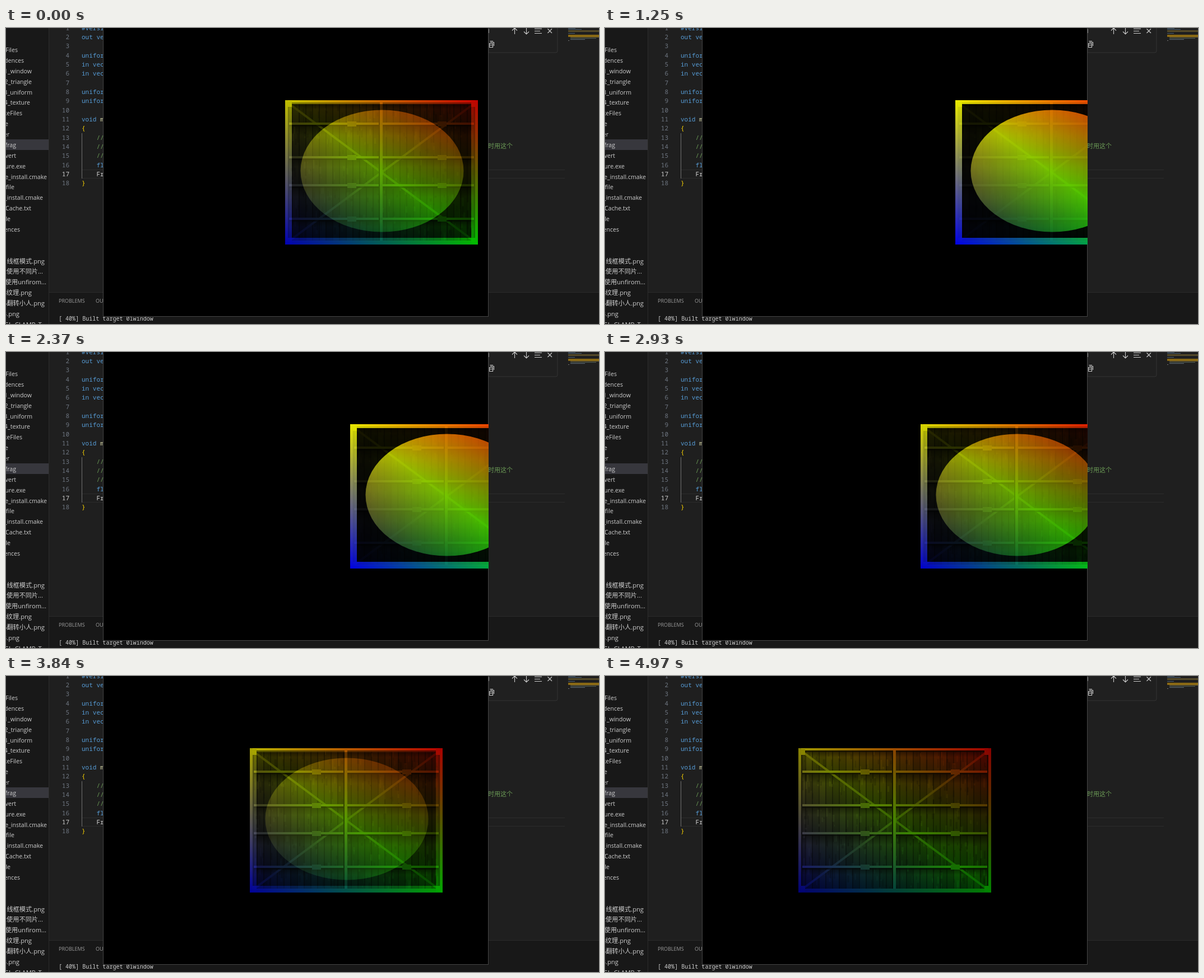
An HTML page with a canvas that plays this animation: 1058x529 px, repeating every 5.04 s.

```html
<!DOCTYPE html>
<html lang="en">
<head>
<meta charset="utf-8">
<title>Shader demo</title>
<style>
  html, body { margin: 0; width: 100%; height: 100%; overflow: hidden; background: #1f1f1f; }
  svg { position: absolute; left: 0; top: 0; }
  canvas { position: absolute; left: 174px; top: 0; }
  text { white-space: pre; dominant-baseline: alphabetic; }
  .ui { font: 10.6px "Open Sans", "Noto Sans CJK SC", "Noto Sans CJK", sans-serif; fill: #ccc; }
  .cjk { font-size: 11.2px; }
  .tab { font-size: 9px; fill: #9d9d9d; }
  .code { font: 11px "Noto Sans Mono", "Noto Sans CJK SC", "Noto Sans CJK", monospace; }
  .term { font: 10.06px "Noto Sans Mono", monospace; fill: #ccc; }
  .icon { fill: none; stroke: #ccc; stroke-width: 1.1; }
</style>
</head>
<body>
<svg id="editor" width="1058" height="529">
  <rect width="1058" height="529" fill="#1f1f1f"/>
  <path d="M135 253.5H997M135 268.5H997" stroke="#2c2c2c"/>
  <path d="M135.5 188V269" stroke="#707070"/>
  <rect width="76" height="529" fill="#181818"/>
  <rect y="199" width="76" height="19" fill="#37373d"/>
  <rect x="77" y="472" width="981" height="57" fill="#181818"/>
  <path d="M76.5 0V529M77 472.5H1058" stroke="#2b2b2b"/>
  <path d="M861 -1H984V41Q984 44 981 44H861Z" fill="#202020" stroke="#343434"/>
  <g class="icon">
    <path d="M907.5 11V0M903 4.5L907.5 0L912 4.5M928.5 0V11M924 6.5L928.5 11L933 6.5"/>
    <path d="M943 1.5H956M943 5.5H953M943 9.5H956M966.5 1.5L974 9M974 1.5L966.5 9"/>
    <path d="M862.5 27.5H868.5V34.5H862.5ZM864 25.5H870.5V32M863 30.5H868M863.5 23.5H869"/>
  </g>
  <path d="M861.5 2V9" stroke="#888"/>
  <g id="minimap"></g>
  <g id="labels"></g>
  <rect x="173.5" y="-1" width="687" height="516.5" fill="#000" stroke="#454545"/>
</svg>
<canvas id="view" width="687" height="515"></canvas>
<script>
const labels = document.getElementById('labels');
const minimap = document.getElementById('minimap');

function add(parent, tag, attrs, text = '') {
  const el = document.createElementNS('http://www.w3.org/2000/svg', tag);
  for (const key in attrs) el.setAttribute(key, attrs[key]);
  el.textContent = text;
  parent.append(el);
}
const label = (cls, x, y, text, fill, anchor = 'start') =>
  add(labels, 'text', { class: cls, x, y, 'text-anchor': anchor, ...(fill && { fill }) }, text);

// Sidebar: row number, right edge, name
[[0, 21, 'CMakeFiles'], [1, 32, 'dependences'], [2, 46, '01_window'], [3, 46, '02_triangle'],
 [4, 47, '03_uniform'], [5, 43, '04_texture'], [6, 29, 'CMakeFiles'], [7, 4, 'texture'],
 [8, 6, 'shader'], [9, 18, 'texture.frag'], [10, 18, 'texture.vert'], [11, 35, 'texture.exe'],
 [12, 73, 'cmake_install.cmake'], [13, 15, 'Makefile'], [14, 66, 'cmake_install.cmake'],
 [15, 45, 'CMakeCache.txt'], [16, 8, 'Makefile'], [17, 25, 'dependences'],
 [20, 69, '1线框模式.png'], [21, 66, '2使用不同片...'], [22, 72, '3使用unfirom...'],
 [23, 46, '4纹理.png'], [24, 69, '5翻转小人.png'], [25, 24, '3.png'], [26, 72, 'GL_CLAMP_T...']
].forEach(([row, x, name]) =>
  label(row < 20 ? 'ui' : 'ui cjk', x, 43 + row * 18.88, name, '', 'end'));

const blue = '#569cd6', green = '#6a9955', gold = '#ffd700';
const code = {
  1: ['#version', blue], 2: ['out vec4', blue], 4: ['uniform', blue], 5: ['in vec3', blue],
  6: ['in vec2', blue], 8: ['uniform', blue], 9: ['uniform', blue], 11: ['void', blue],
  12: ['{', gold], 13: ['    //', green], 14: ['    //', green], 15: ['    //', green],
  16: ['    fl', blue], 17: ['    Fr', '#d4d4d4'], 18: ['}', gold]
};
for (let n = 1; n <= 18; n++) {
  const y = 20 + (n - 2) * 16.33;
  label('code', 113, y, n, n === 17 ? '#ccc' : '#6e7681', 'end');
  if (code[n]) label('code', 135, y, ...code[n]);
}
label('code', 168, 20 + 9 * 16.33, 'm', '#dcdcaa');
label('code', 904, 215, '时用这个', green, 'end');
label('ui tab', 94, 491, 'PROBLEMS');
label('ui tab', 160, 491, 'OUTPUT');
label('term', 94, 523, '[ 40%] Built target 01window');

// Minimap: x, y, width, height, colour
[[1003, 0, 13, 1, '#4d6173'], [1003, 2, 24, 1, '#4d6173'], [1003, 4, 55, 3, '#554a29'],
 [1003, 9, 12, 1, '#4d6173'], [1003, 12, 55, 4, '#8a6914'], [1007, 16, 51, 1, '#6d6034'],
 [1007, 18, 46, 1, '#596358'], [1007, 20, 26, 1, '#5e6b75'], [1003, 22, 2, 1, '#777']
].forEach(([x, y, width, height, fill]) => add(minimap, 'rect', { x, y, width, height, fill }));

const W = 344, H = 258;
function layer(paint) {
  const c = document.createElement('canvas');
  c.width = W;
  c.height = H;
  const g = c.getContext('2d');
  if (paint) paint(g);
  return c;
}
let seed = 7;
const rand = () => (seed = seed * 16807 % 2147483647) / 2147483647;
const grey = (v, a = 1) => `rgba(${v},${v * .95},${v * .87},${a})`;

const crate = layer(g => {
  const rect = (x, y, w, h, v, a) => { g.fillStyle = grey(v, a); g.fillRect(x, y, w, h); };
  const beams = [2, 42, 102, 152, 212, 253];
  for (let i = 0; i < 5; i++) {
    const top = beams[i], h = beams[i + 1] - top;
    for (let x = 0; x < W; x += 12) {
      rect(x, top, 12, h, 68 + rand() * 22);
      rect(x, top, 2, h, 30, .5);
    }
    const shade = g.createLinearGradient(0, top, 0, top + h);
    shade.addColorStop(0, 'rgba(0,0,0,.6)');
    shade.addColorStop(.35, 'rgba(0,0,0,.05)');
    shade.addColorStop(1, 'rgba(0,0,0,.25)');
    g.fillStyle = shade;
    g.fillRect(0, top, W, h);
  }
  for (let i = 0; i < 400; i++)
    rect(rand() * W, rand() * H, 1 + rand() * 3, 3 + rand() * 14, rand() < .6 ? 25 : 125, .25);
  g.strokeStyle = grey(112);
  g.lineWidth = 4;
  g.beginPath();
  g.moveTo(4, 4); g.lineTo(340, 254);
  g.moveTo(340, 4); g.lineTo(4, 254);
  g.stroke();
  for (const y of beams) {
    rect(0, y + 2, W, 3, 25, .7);
    rect(0, y - 2, W, 4, 140);
    if (y > 2 && y < 250) for (const x of [111, 272]) rect(x, y - 4, 16, 9, 118);
  }
  rect(167, 4, 2, 248, 30);
  rect(169, 2, 5, 252, 138);
  rect(0, 0, W, 4, 160);
  rect(0, 251, W, 7, 130);
  for (const x of [0, 339]) rect(x, 0, 5, H, 138);
  for (const x of [5, 337]) rect(x, 4, 2, 247, 35);
  for (const x of [2, 332]) for (const y of [2, 246]) rect(x, y, 10, 10, 140);
});

const disc = layer(g => {
  g.fillStyle = '#fff';
  g.fillRect(0, 0, W, H);
  g.fillStyle = '#000';
  g.fillRect(12, 7, 320, 239);
  g.fillStyle = '#ffd84b';
  g.beginPath();
  g.ellipse(173, 126.5, 145.5, 109, 0, 0, 7);
  g.fill();
});

// Corner colours yellow, red, green, blue blended over two triangles
const tint = layer(g => {
  const img = g.createImageData(W, H);
  for (let i = 0; i < W * H; i++) {
    const x = i % W / W, y = Math.floor(i / W) / H;
    img.data.set([255 * (1 - y), 255 * (1 - Math.abs(x - y)), 255 * Math.max(0, y - x), 255], i * 4);
  }
  g.putImageData(img, 0, 0);
});

const quad = layer(), q = quad.getContext('2d');
const view = document.getElementById('view').getContext('2d');
const LOOP = 5040, STEP = 70;

// One value drives both the slide and the cross-fade
function draw(now) {
  const step = Math.min(71, Math.floor((now % LOOP + 10) / STEP));
  const mix = Math.sin(.5 + .5 * Math.cos(step * .0675 - 1.65));
  q.globalCompositeOperation = 'source-over';
  q.drawImage(crate, 0, 0);
  q.globalAlpha = mix;
  q.drawImage(disc, 0, 0);
  q.globalAlpha = 1;
  q.globalCompositeOperation = 'multiply';
  q.drawImage(tint, 0, 0);
  view.clearRect(0, 0, 687, 515);
  view.drawImage(quad, Math.round(170.9 + 343.5 * mix), 129);
}

const start = performance.now();
function tick() {
  draw(performance.now() - start);
  requestAnimationFrame(tick);
}
tick();
</script>
</body>
</html>
```
